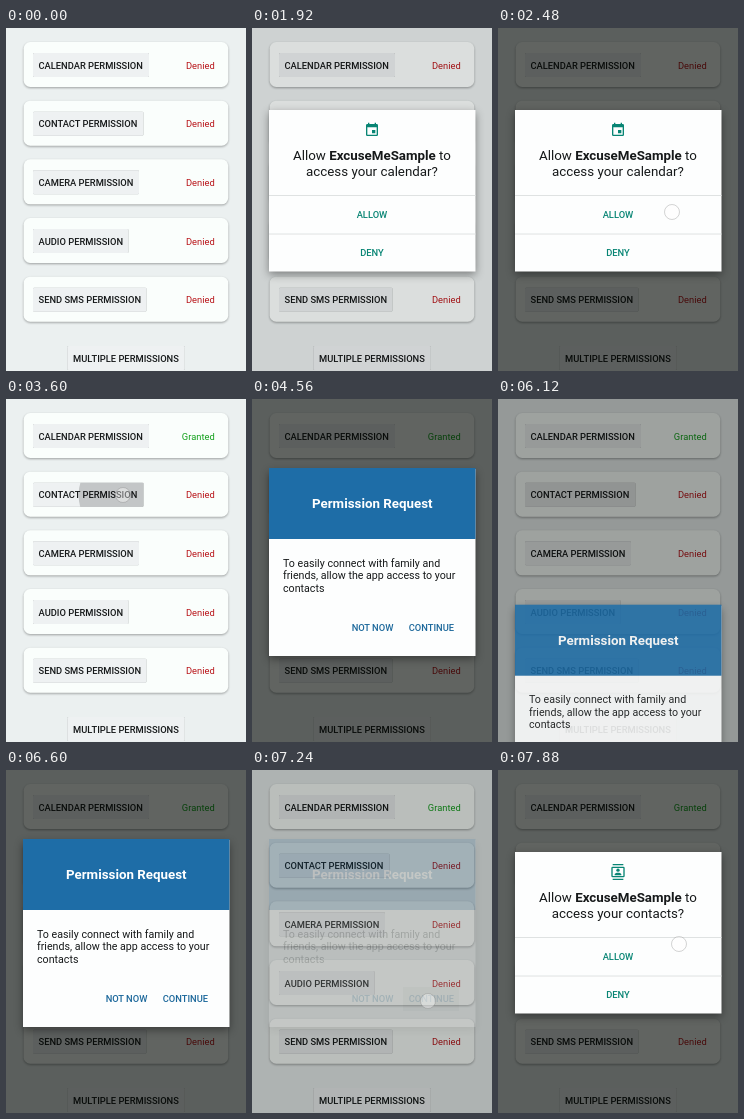
Recreate the animation shown at these times as an HTML page. Size 240 by 343 pixels, loop 8 s.

```html
<!DOCTYPE html>
<html lang="en">
<head>
<meta charset="utf-8">
<title>Permission requests</title>
<style>
  html, body { margin: 0; width: 100%; height: 100%; overflow: hidden; background: #ebf0f0; }
  svg { display: block; width: 100vw; height: 100vh; }
  text { font: 9.333px Roboto, sans-serif; fill: #16191a; }
  .label { font-weight: 500; }
  .mid { text-anchor: middle; }
  .end { text-anchor: end; }
  .large { font-size: 13.333px; }
  .body { font-size: 10.667px; }
  .bold { font-weight: 700; }
  .teal { fill: #088574; }
  .blue { fill: #1c689b; }
  .card { fill: #fafefc; filter: drop-shadow(0 1px 1px #0005); }
  .button { fill: #eef1f2; filter: drop-shadow(0 .8px .7px #0005); }
  .dialog { fill: #fdfefe; filter: drop-shadow(0 3px 4px #0006); }
  .denied { fill: #b81419; }
  .granted { fill: #13a01c; }
  .touch { fill: #fff; fill-opacity: .4; stroke: #777; stroke-opacity: .4; stroke-width: .8; }
</style>
</head>
<body>
<svg viewBox="0 0 240 343">
  <g id="page"></g>
  <rect id="scrim" width="240" height="343" fill="#000400"/>
  <g id="rationale">
    <rect class="dialog" x="17" y="70" width="206.5" height="187"/>
    <rect x="17" y="69" width="206.5" height="71" fill="#1e6da7"/>
    <text class="large bold mid" x="120.3" y="109.3" style="fill:#fff">Permission Request</text>
    <text class="body" x="31" y="167.5">To easily connect with family and</text>
    <text class="body" x="31" y="180">friends, allow the app access to your</text>
    <text class="body" x="31" y="192.5">contacts</text>
    <text class="label blue" x="99.7" y="232.4">NOT NOW</text>
    <text class="label blue" x="156.7" y="232.4">CONTINUE</text>
  </g>
  <g id="system">
    <rect class="dialog" x="17" y="82" width="206.5" height="161.5"/>
    <g id="calendarIcon" class="teal" transform="translate(112 94) scale(.6667)">
      <path d="M6 1h2v4H6zM16 1h2v4h-2zM12 12h5v5h-5z"/>
      <path fill-rule="evenodd" d="M5 3h14q2 0 2 2v14q0 2-2 2H5q-2 0-2-2V5q0-2 2-2zM5 8v11h14V8z"/>
    </g>
    <g id="contactsIcon" class="teal" transform="translate(112 94) scale(.6667)">
      <path d="M4 0h16v2H4zM4 22h16v2H4zM7 17v-1.5c0-3.3 10-3.3 10 0V17z"/>
      <circle cx="12" cy="9.3" r="2.5"/>
      <rect x="3" y="5" width="18" height="14" rx="1" fill="none" stroke="#088574" stroke-width="2"/>
    </g>
    <text class="large mid" x="120" y="132.3">Allow <tspan class="bold">ExcuseMeSample</tspan> to</text>
    <text class="large mid" x="120" y="148" id="question"></text>
    <path d="M17 167.5h206.5M17 206h206.5" stroke="#dfe2e2"/>
    <text class="label teal mid" x="120" y="190.4">ALLOW</text>
    <text class="label teal mid" x="120" y="228.4">DENY</text>
  </g>
  <g id="touches"></g>
</svg>
<script>
const LOOP = 8000;
const $ = id => document.getElementById(id);
const ramp = (t, from, to) => Math.min(1, Math.max(0, (t - from) / (to - from)));
const pulse = (t, [inFrom, inTo, outFrom, outTo]) => ramp(t, inFrom, inTo) - ramp(t, outFrom, outTo);
const add = (parent, markup) => parent.insertAdjacentHTML('beforeend', markup);

// Page: five rows and one loose button
const rows = [['CALENDAR', 116], ['CONTACT', 110.5], ['CAMERA', 106], ['AUDIO', 95.5], ['SEND SMS', 113.5]];
rows.forEach(([name, width], i) => add($('page'), `<g transform="translate(0 ${i * 58.667})">
  <rect class="card" x="17.7" y="14" width="204.5" height="45" rx="6.5"/>
  <rect class="button" x="27" y="25" width="${width}" height="24" rx="1.3"/>
  <text class="label" x="32.5" y="40.5">${name} PERMISSION</text>
  <text class="end denied" x="208.7" y="40.5">Denied</text></g>`));
add($('page'), `<rect class="button" x="61.3" y="318" width="117.5" height="24" rx="1.3"/>
  <text class="label mid" x="120" y="333.7">MULTIPLE PERMISSIONS</text>`);
const calendarStatus = document.querySelector('.denied');

// Taps: finger position, time shown and hidden, ripple start, ripple box
const taps = [
  { x: 111, y: 38, on: 1000, off: 1480, press: 1200, layer: 'page', box: [27, 25, 116, 24] },
  { x: 174, y: 184, on: 2480, off: 2760, press: 2640, layer: 'system', box: [17, 168, 206.5, 38] },
  { x: 117, y: 96, on: 3360, off: 3720, press: 3600, layer: 'page', box: [27, 83.7, 110.5, 24] },
  { x: 121, y: 230, on: 4720, off: 5160, press: 4840, layer: 'rationale', box: [94, 217, 53, 24] },
  { x: 114, y: 93, on: 5600, off: 5920, press: 5800, layer: 'page', box: [27, 83.7, 110.5, 24] },
  { x: 176, y: 231, on: 6920, off: 7360, press: 7040, layer: 'rationale', box: [151, 217, 56, 24] },
  { x: 181, y: 174, on: 7880, off: LOOP, press: LOOP, layer: 'system', box: [17, 168, 206.5, 38] }
];
taps.forEach((tap, i) => {
  const [x, y, w, h] = tap.box;
  add($(tap.layer), `<clipPath id="clip${i}"><rect x="${x}" y="${y}" width="${w}" height="${h}"/></clipPath>
    <g clip-path="url(#clip${i})"><circle id="ripple${i}" cx="${tap.x}" cy="${tap.y}"/></g>`);
  add($('touches'), `<circle id="touch${i}" class="touch" cx="${tap.x}" cy="${tap.y}" r="7.5"/>`);
  tap.ripple = $('ripple' + i);
  tap.touch = $('touch' + i);
});

const scrims = [[1880, 2080, 2720, 2960], [3800, 4000, 4920, 5120], [6000, 6200, 7120, 7330], [7520, 7720, LOOP, LOOP + 1]];
const systemFades = [[1840, 1900, 2720, 2860], [7480, 7540, LOOP, LOOP + 1]];
const sum = (t, spans) => spans.reduce((total, span) => total + pulse(t, span), 0);

function draw(t) {
  $('scrim').setAttribute('opacity', 0.61 * sum(t, scrims));

  const second = t >= 5500;
  const open = second ? 6000 : 3800, close = second ? 7120 : 4920;
  const slide = ramp(t, open, open + 400);
  $('rationale').setAttribute('transform', `translate(0 ${281 * (1 - slide) ** 2})`);
  $('rationale').setAttribute('opacity', Math.min(1, slide * 2.85) * (1 - ramp(t, close, close + 142)));

  const contacts = t > 5000;
  $('system').setAttribute('opacity', sum(t, systemFades));
  $('calendarIcon').style.display = contacts ? 'none' : '';
  $('contactsIcon').style.display = contacts ? '' : 'none';
  $('question').textContent = `access your ${contacts ? 'contacts' : 'calendar'}?`;

  const granted = t >= 2760;
  calendarStatus.textContent = granted ? 'Granted' : 'Denied';
  calendarStatus.setAttribute('class', granted ? 'end granted' : 'end denied');

  for (const { on, off, press, touch, ripple } of taps) {
    touch.setAttribute('opacity', t >= on && t < off ? 1 : 0);
    ripple.setAttribute('r', 44 + 0.4 * Math.max(0, t - press));
    ripple.setAttribute('opacity', t < press ? 0 : 0.18 * (1 - ramp(t, press + 100, press + 380)));
  }
}

const start = performance.now();
(function tick() {
  draw((performance.now() - start) % LOOP);
  requestAnimationFrame(tick);
})();
</script>
</body>
</html>
```
